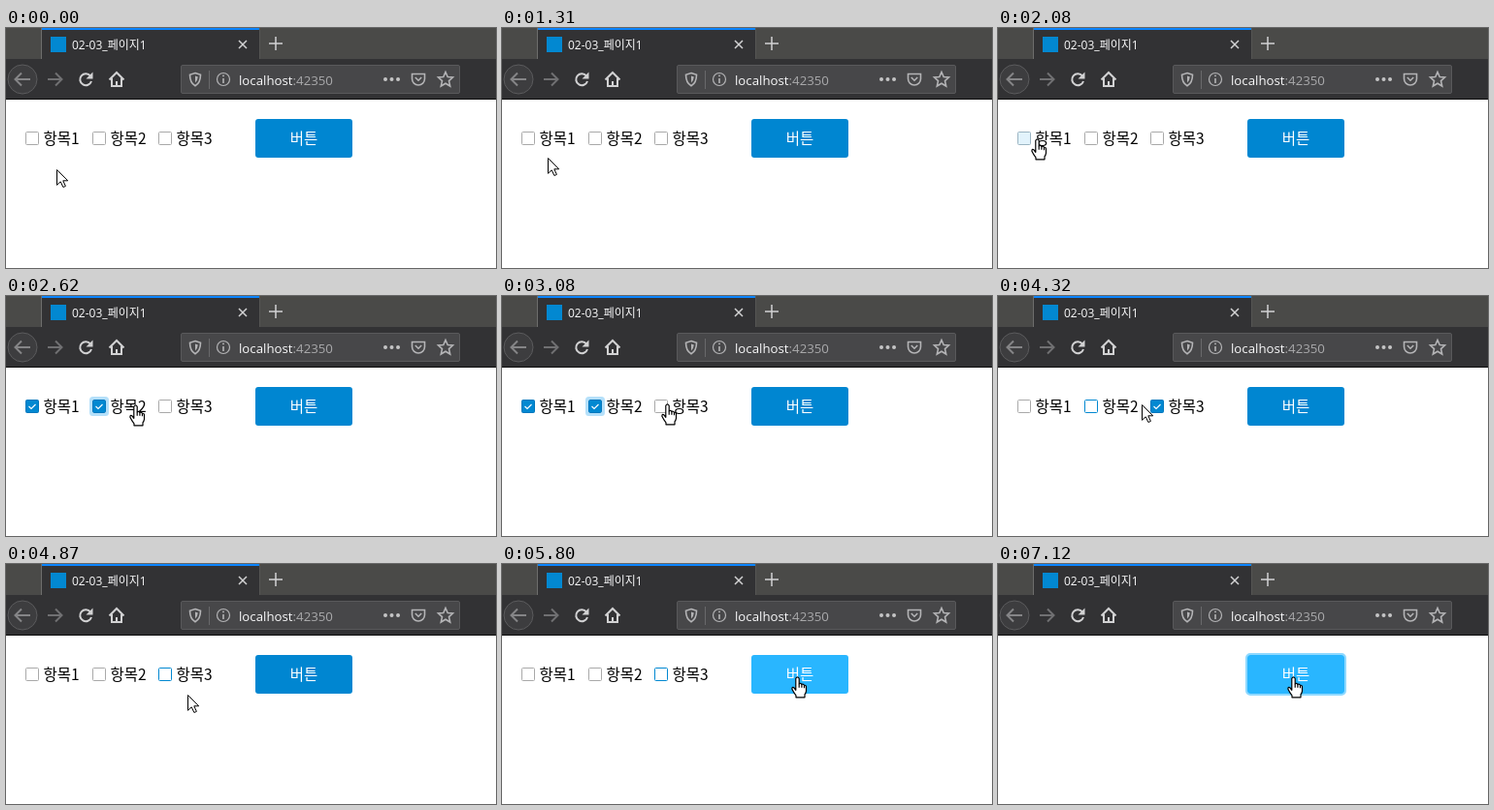
Animation of 505x248 px, one loop 8130 ms. Source, as an HTML page:

```html
<!DOCTYPE html>
<html lang="ko">
<head>
<meta charset="utf-8">
<style>
html, body { margin: 0; width: 100%; height: 100%; overflow: hidden; background: #fff; }
svg { display: block; }
text { font-family: "Open Sans", "Noto Sans CJK KR", "Noto Sans CJK", sans-serif; }
.ko { font-family: "Noto Sans CJK KR", "Noto Sans CJK", "Noto Sans CJK JP", sans-serif; }
.icon { fill: none; stroke: #d2d2d3; stroke-width: 2; }
</style>
</head>
<body>
<svg width="505" height="248" viewBox="0 0 505 248">
  <!-- tab strip -->
  <rect width="505" height="32" fill="#4a4a48"/>
  <rect x="36" width="1" height="32" fill="#6d6d6c"/>
  <rect x="261" width="1" height="32" fill="#555554"/>
  <rect x="37" width="224" height="32" fill="#323234"/>
  <rect x="37" width="224" height="2" fill="#0a84ff"/>
  <rect x="46" y="9" width="16" height="16" fill="#0288d1"/>
  <text x="68" y="22" font-size="12" fill="#f9f9fa">02-03_페이지1</text>
  <path class="icon" style="stroke-width:1.500" d="M240 13l8 8m0-8l-8 8M271 16h14M278 9v14"/>

  <!-- toolbar -->
  <rect y="32" width="505" height="41" fill="#323234"/>
  <rect y="73" width="505" height="1" fill="#0c0c0d"/>
  <circle cx="17" cy="53" r="15" fill="#3d3d3f" stroke="#5b5b5d"/>
  <g class="icon">
    <path stroke="#858587" d="M25 53H10m6-6.500l-6.500 6.500l6.500 6.500"/>
    <path stroke="#707072" d="M43 53h14m-6-6.500l6.500 6.500l-6.500 6.500"/>
    <path d="M87 49.500A6 6 0 1 0 88 55"/>
    <path d="M89.500 45.500v7h-7z" fill="#d2d2d3" stroke="none"/>
    <path d="M106.500 53.500l7.500-7.500l7.500 7.500M109 52v8h10v-8M114 60v-5"/>
  </g>
  <rect x="180.500" y="38.500" width="287" height="29" rx="1.500" fill="#474749" stroke="#59595b"/>
  <path d="M209.500 44v19" stroke="#69696b"/>
  <g class="icon" style="stroke:#b4b4b6;stroke-width:1.600">
    <path d="M195 46.500l5.500 1.800q0 8.500-5.500 11.500q-5.500-3-5.500-11.500z"/>
    <path d="M195 49.500v7q2.500-2 2.800-6z" fill="#b4b4b6" stroke="none"/>
    <circle cx="224" cy="53" r="6.500" stroke-width="1.200"/>
    <path d="M224 52v5m0-8.500v1.700"/>
    <path d="M418.500 47.500h13v5a6.500 6.500 0 0 1-13 0zm3.300 3.500l3.200 3.200l3.200-3.200"/>
    <path d="M453 45.500l2.200 5l5.300.5l-4 3.600l1.200 5.400l-4.700-2.800l-4.700 2.800l1.200-5.400l-4-3.600l5.300-.5z"/>
  </g>
  <path d="M391 53h.01m6.500 0h.01m6.500 0h.01" stroke="#c4c4c5" stroke-width="4" stroke-linecap="round"/>
  <text x="240" y="59" font-size="13.25" fill="#f9f9fa">localhost<tspan fill="#a9a9ab">:42350</tspan></text>

  <!-- page -->
  <g id="items"></g>
  <rect id="ring" x="256" y="93" width="102" height="42" rx="4" fill="none" stroke="#8fd9ff" stroke-width="2"/>
  <rect id="button" x="257" y="94" width="100" height="40" rx="3"/>
  <text class="ko" x="307" y="119.500" font-size="15.500" fill="#fff" text-anchor="middle">버튼</text>

  <g id="cursor" stroke="#000" stroke-linejoin="round">
    <path id="arrow" fill="#fff" d="M.5.5V16.300l3.700-3.500l2.700 5.700l2.500-1.100l-2.600-5.600h4.900z"/>
    <g id="hand" fill="#fff" stroke-width="1.200" transform="translate(.5 -.7)">
      <path d="M-1.700 2Q0-.8 1.700 2V7.500Q3.200 6.300 4.400 8Q6 7.200 7 9Q9 8.600 9 11V15Q8.600 17.200 7.500 18.500V21.500H-1.500V19.500Q-4 16.500-5.600 13Q-5.600 10.300-3.600 11.500L-1.700 14Z"/>
      <path d="M1.700 7.500V11.500M4.400 8V11.500M7 9V12" fill="none"/>
    </g>
  </g>
</svg>
<script>
const $ = id => document.getElementById(id);
const LOOP = 8130, STEP = 77.4, LEAD = 20;

// step, x, y of the pointer tip
const path = [
  [0, 52, 146], [15, 52, 146], [20, 40, 115], [28, 40, 115], [31, 104, 113], [33, 104, 113],
  [35, 161, 112], [40, 170, 112], [42, 172, 112], [45, 60, 100], [47, 60, 100], [49, 98, 111],
  [53, 98, 111], [57, 164, 112], [60, 165, 112], [63, 187, 135], [66, 234, 159], [68, 234, 159],
  [69, 234, 157], [72, 234, 157], [73, 252, 148], [74, 288, 126], [75, 304, 117], [106, 304, 117]
];

// fill, border, check mark, glow
const looks = {
  off: ['#fff', '#a9a9a9', 0, 0],
  press: ['#e2f3fc', '#9bb4c2', 0, 0],
  glow: ['#0288d1', '#0277bd', 1, 1],
  on: ['#0288d1', '#0277bd', 1, 0],
  fade: ['#3fa4dc', '#2b93cf', 1, 0],
  focus: ['#fff', '#0288d1', 0, 0]
};

const boxes = [
  { x: 20, when: [[0, 'off'], [25, 'press'], [28, 'glow'], [32, 'on'], [48, 'fade'], [50, 'focus'], [52, 'off']] },
  { x: 89, when: [[0, 'off'], [32, 'press'], [33, 'glow'], [41, 'on'], [52, 'fade'], [54, 'focus'], [58, 'off']] },
  { x: 157, when: [[0, 'off'], [41, 'press'], [42, 'glow'], [47, 'on'], [58, 'fade'], [60, 'focus']] }
];

$('items').innerHTML = boxes.map((b, i) => `
  <g transform="translate(${b.x} 107)">
    <rect x="-1.500" y="-1.500" width="17" height="17" rx="2" fill="none" stroke="#b5e0fa" stroke-width="3"/>
    <rect x=".5" y=".5" width="13" height="13" rx="1"/>
    <path d="M3.500 7l2.500 2.500l4.500-4.500" fill="none" stroke="#fff" stroke-width="1.100"/>
    <text class="ko" x="18.500" y="12.500" font-size="15.500">항목${i + 1}</text>
  </g>`).join('');
boxes.forEach((b, i) => b.parts = $('items').children[i].children);

const show = (el, on) => el.setAttribute('visibility', on ? 'visible' : 'hidden');
const latest = (list, n) => list.filter(k => k[0] <= n).pop()[1];

function pointer(n) {
  const i = path.findIndex(k => k[0] > n);
  const [n0, x0, y0] = path[i - 1], [n1, x1, y1] = path[i];
  const u = (n - n0) / (n1 - n0);
  return [x0 + (x1 - x0) * u, y0 + (y1 - y0) * u].map(Math.round);
}

function draw(now) {
  const n = Math.floor((now % LOOP + LEAD) / STEP);
  const [x, y] = pointer(n);
  const gone = n >= 91;

  for (const { when, parts: [glow, box, check] } of boxes) {
    const [fill, border, checked, glowing] = looks[latest(when, n)];
    box.setAttribute('fill', fill);
    box.setAttribute('stroke', border);
    show(check, checked);
    show(glow, glowing);
  }
  $('items').style.display = gone ? 'none' : '';

  const onButton = x >= 257 && x < 357 && y >= 94 && y < 134;
  const onItem = !gone && boxes.some(b => x >= b.x && x < b.x + 56) && y >= 98 && y < 128;
  const held = n === 89 || n === 90;
  $('button').setAttribute('fill', held ? '#0277bd' : onButton ? '#29b6ff' : '#0086d1');
  show($('ring'), n >= 89);

  $('cursor').setAttribute('transform', `translate(${x} ${y})`);
  show($('hand'), onButton || onItem);
  show($('arrow'), !(onButton || onItem));
}

const start = performance.now();
function tick() {
  draw(performance.now() - start);
  requestAnimationFrame(tick);
}
tick();
</script>
</body>
</html>
```
